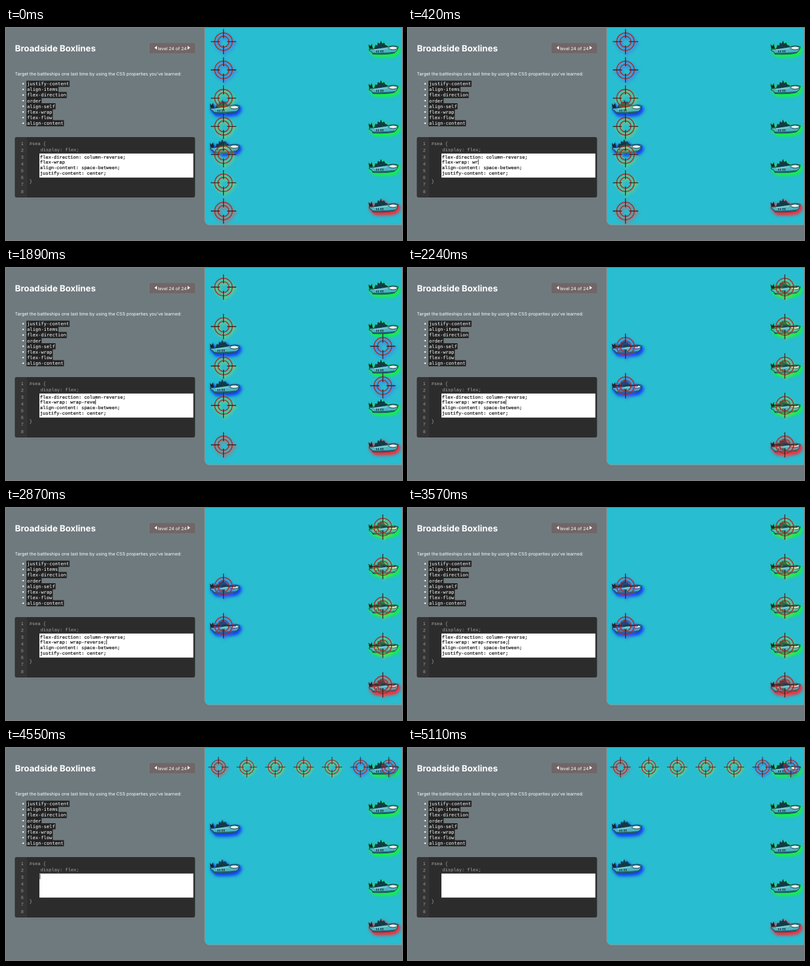
An HTML page for the animation above (5.18 s loop, 640 by 344 pixels).

```html
<!DOCTYPE html>
<html lang="en">
<head>
<meta charset="utf-8">
<title>Broadside Boxlines</title>
<style>
  html, body { margin: 0; width: 100%; height: 100%; overflow: hidden; background: #6f7a7e; }
  svg { display: block; width: 100vw; height: 100vh; }
  text { white-space: pre; text-rendering: geometricPrecision; }
  .ui { font: 7.16px Inter, "Open Sans", sans-serif; fill: #fff; }
  .title { font: 700 14px Inter, "Open Sans", sans-serif; fill: #fff; }
  .term { font: 7.5px "DejaVu Sans Mono", monospace; fill: #fff; }
  .code { font: 7.45px "Liberation Mono", monospace; fill: #a8a8a8; }
  .typed { fill: #000; stroke: #000; stroke-width: .15px; }
  .num { fill: #9a9a9a; text-anchor: middle; }
  .boat { filter: drop-shadow(2px 3px 2.5px var(--glow)) drop-shadow(1px 1px 1.5px var(--glow)); }
  .target { filter: drop-shadow(2.5px 3px 2px var(--glow)); }
</style>
</head>
<body>
<svg viewBox="0 0 640 344" preserveAspectRatio="none">
  <defs>
    <g id="boat" stroke-linejoin="round">
      <path d="M-23 0L-24 -7L-21 -4L-19 -8L-17 0Z" fill="#14262c"/>
      <path d="M-15 0L-13 -6L-10 -5L-9 -10L-6 -8L-4 -13L-2 -8L1 -10L3 -6L6 -5L8 -2L6 1Z" fill="#123b44"/>
      <path d="M-23 1L-12 0L7 -3Q17 -6 24 -3Q24 2 18 7Q6 10 -17 9Q-18 4 -23 3Z"
            fill="#4fb4c2" stroke="#12363e" stroke-width="1"/>
      <path d="M-18 6.5Q2 7.5 19 5L18 7Q6 10 -17 9Z" fill="#1e6372"/>
      <path d="M-15 2L6 0" stroke="#a9dfe2" stroke-width=".9"/>
      <path d="M-11 3V6M-8 3V6M-4 2.5V6M-1 2.5V6" stroke="#12363e" stroke-width="1.4"/>
      <ellipse cx="15.5" cy="-1" rx="6.8" ry="2.7" fill="#e4f4f5" stroke="#12363e" stroke-width="1"/>
    </g>
    <g id="target" fill="none">
      <g stroke="#a5302b" stroke-width="1.6"><circle r="14.2"/><circle r="8.8"/></g>
      <path d="M-20.5 0H-6M6 0H20.5M0 -20.5V-6M0 6V20.5" stroke="#3a1f20" stroke-width="1.3"/>
    </g>
    <filter id="soft" x="-10%" y="-10%" width="120%" height="120%"><feGaussianBlur stdDeviation="1.2"/></filter>
  </defs>

  <rect width="640" height="344" fill="#6f7a7e"/>
  <text class="title" x="14.4" y="38.3">Broadside Boxlines</text>
  <rect x="232" y="24.5" width="73.5" height="16.5" rx="1.5" fill="#716667"/>
  <path d="M240 32L244 29V35ZM297.5 32L293.5 29V35Z" fill="#fff"/>
  <text class="ui" x="245.5" y="35.5">level 24 of 24</text>
  <text class="ui" x="14.5" y="76.8">Target the battleships one last time by using the CSS properties you've learned:</text>
  <g id="terms"></g>

  <rect x="14.5" y="177" width="291" height="98" rx="3" fill="#2c2c2c"/>
  <path d="M34 177H17.5Q14.5 177 14.5 180V272Q14.5 275 17.5 275H34Z" fill="#343434"/>
  <g id="numbers"></g>
  <text class="code" x="37.8" y="189.6">#sea {</text>
  <text class="code" x="55.7" y="200.4">display: flex;</text>
  <rect x="54" y="203.7" width="248.8" height="39" fill="#fff"/>
  <text class="code" x="37.8" y="250.8">}</text>
  <g id="selection" fill="#b3d4fc"></g>
  <g id="editor"></g>
  <rect id="caret" width=".8" height="8.4" fill="#000"/>

  <rect x="320.5" y="-10" width="330" height="331" rx="9" fill="#566266" opacity=".5" filter="url(#soft)"/>
  <rect x="321.2" y="-10" width="330" height="329.5" rx="8" fill="#28bdd1" stroke="#84979c" stroke-width="1.4"/>
  <g id="boats"></g>
  <g id="targets"></g>
</svg>
<script>
  const LOOP = 5180, WRAP = 700, REVERSE = 2240, SELECT = 3710, CLEAR = 4340;
  const CHAR = 4.47, LEFT = 55, LINE = 8.7;
  const lineTop = i => 204.4 + i * LINE;
  const $ = id => document.getElementById(id);

  function add(parent, tag, attrs, text = "") {
    const el = document.createElementNS("http://www.w3.org/2000/svg", tag);
    for (const key in attrs) el.setAttribute(key, attrs[key]);
    el.textContent = text;
    return parent.appendChild(el);
  }

  const terms = ["justify-content", "align-items", "flex-direction", "order",
                 "align-self", "flex-wrap", "flex-flow", "align-content"];
  terms.forEach((term, i) => {
    const y = 90.5 + i * 9.14;
    add($("terms"), "circle", { cx: 27.7, cy: y, r: 1.2, fill: "#fff" });
    add($("terms"), "rect", { x: 33, y: y - 5, width: term.length * 4.515 + 2, height: 10, rx: .8, fill: "#232323" });
  });
  terms.forEach((term, i) => {
    add($("terms"), "text", { class: "term", x: 34, y: 93.2 + i * 9.14 }, term);
  });
  for (let i = 0; i < 8; i++) {
    add($("numbers"), "text", { class: "code num", x: 26.2, y: 189.5 + i * 11.15 }, i + 1);
  }

  const rules = ["flex-direction: column-reverse;", "flex-wrap",
                 "align-content: space-between;", "justify-content: center;"];
  const suffix = ": wrap-reverse;";
  const keys = [140, 210, 350, 420, 560, WRAP,
                1330, 1470, 1610, 1750, 1890, 1960, 2100, REVERSE, 2520];
  const lines = rules.map((rule, i) => {
    const chars = rule.length + (i === 1 ? suffix.length : 0) + (i < 3 ? 1 : 0);
    add($("selection"), "rect", { x: LEFT, y: lineTop(i), width: chars * CHAR, height: LINE + .1 });
    return add($("editor"), "text", { class: "code typed", x: LEFT, y: lineTop(i) + 7.1 }, rule);
  });

  const boatGlow = { red: "#f22d3c", green: "#16ed4c", blue: "#1648ee" };
  const targetGlow = { red: "#f84a45", green: "#96d64a", blue: "#5c5cf0" };
  const fleet = ["red", "green", "green", "green", "green", "blue", "blue"];

  // Five items fill the first column from the bottom; the last two are centred in the next.
  const columnY = i => i < 5 ? 287 - i * 64 : 191 - (i - 5) * 64;
  const layouts = {
    nowrap: i => [351.5, 297 - i * 45.8, 1],
    wrap: i => [i < 5 ? 351.5 : 609, columnY(i), 1],
    reverse: i => [i < 5 ? 609 : 351.5, columnY(i), 1],
    row: i => [343.3 + i * 45.9, 31, .8]
  };
  fleet.forEach((color, i) => {
    add($("boats"), "use", {
      href: "#boat", class: "boat", style: `--glow:${boatGlow[color]}`,
      transform: `translate(${i < 5 ? 610 : 353.5} ${columnY(i) + 2.5})`
    });
  });
  const targets = fleet.map(color => add($("targets"), "use", {
    href: "#target", class: "target", style: `--glow:${targetGlow[color]}`
  }));

  let shown = "";
  function place(name) {
    if (name === shown) return;
    shown = name;
    targets.forEach((el, i) => {
      const [x, y, scale] = layouts[name](i);
      el.setAttribute("transform", `translate(${x} ${y}) scale(${scale})`);
    });
  }

  function draw(t) {
    const cleared = t >= CLEAR, selected = t >= SELECT && !cleared;
    const count = keys.filter(key => key <= t).length;
    const line = rules[1] + suffix.slice(0, count);
    lines[1].textContent = line;
    $("editor").style.display = cleared ? "none" : "";
    $("selection").style.display = selected ? "" : "none";

    const lastKey = cleared ? CLEAR : keys[count - 1];
    const blinkOn = (t - lastKey) % 1000 < 500;
    $("caret").style.display = blinkOn && !selected ? "" : "none";
    $("caret").setAttribute("x", cleared ? LEFT - .4 : LEFT + line.length * CHAR);
    $("caret").setAttribute("y", lineTop(cleared ? 0 : 1));

    place(cleared ? "row" : t >= REVERSE ? "reverse" : t >= WRAP ? "wrap" : "nowrap");
  }

  const start = performance.now();
  function tick() {
    draw((performance.now() - start) % LOOP);
    requestAnimationFrame(tick);
  }
  tick();
</script>
</body>
</html>
```
